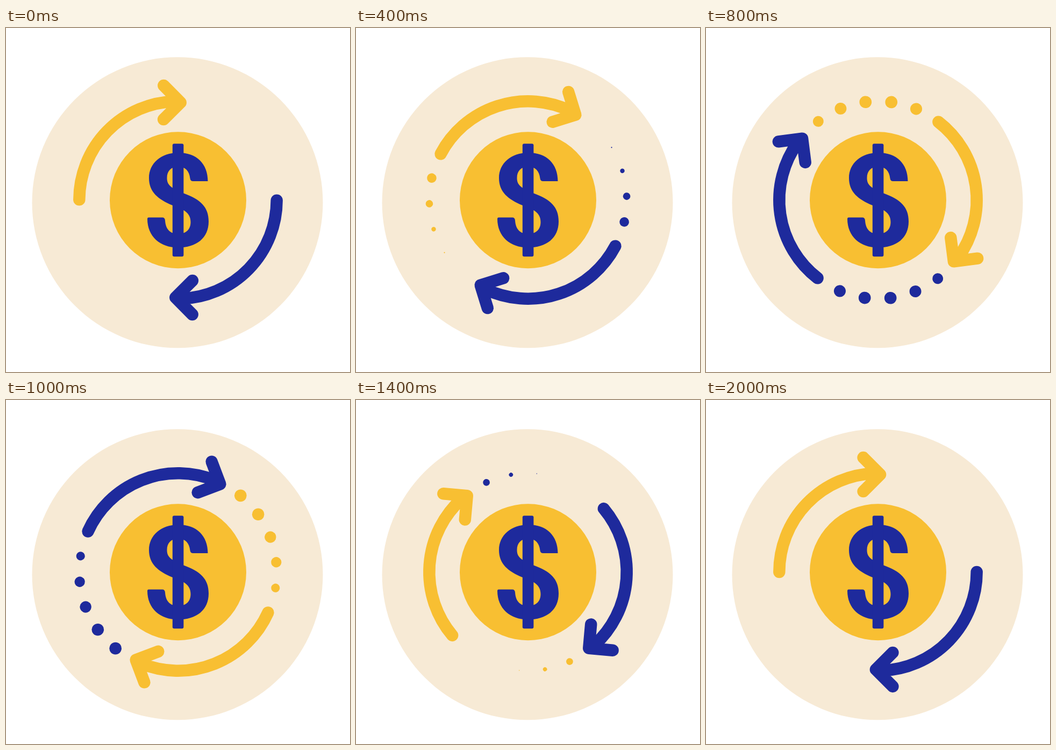
An HTML page with a canvas for the animation above (3 s loop, 640 px wide and 640 px high).

```html
<!DOCTYPE html>
<html lang="en">
<head>
<meta charset="utf-8">
<title>Money cycle</title>
<style>
html, body { margin: 0; width: 100%; height: 100%; overflow: hidden; background: #fff; }
canvas { display: block; width: 640px; height: 640px; }
</style>
</head>
<body>
<canvas id="stage" width="640" height="640"></canvas>
<script>
const ctx = document.getElementById('stage').getContext('2d');
const YELLOW = '#f8bf32', BLUE = '#1e2a9c', CREAM = '#f7ead5';
const LOOP = 3000, STEP = 100, LAST_STEP = 20;
const SPIN = 47;            // length of the turn, in ticks of 1/24 s
const RADIUS = 183.7, STROKE = 22.5, DOT = 11.35;
const rad = deg => deg * Math.PI / 180;

const dollar = new Path2D(
  'M375.5 285C375.5 253 355 232 321 232C288 232 266 252 266 279' +
  'C266 305 283 319 310 330L330.5 339C339 344 343.5 351 343.5 361' +
  'C343.5 375 335 383 320 383C305 383 297 374 296 358' +
  'Q295.5 352.5 291 352.5L265 352.5Q263 352.5 263 355' +
  'C263 388 287 408.5 320 408.5C354 408.5 377 391 377 360' +
  'C377 333 362 319 330.5 307.5L310 297.5C302 292 299.5 287 299.5 279' +
  'C299.5 266 307 258 320 258C334 258 341 266 342.5 280Q343 285 348 285Z');
const bar = new Path2D();
bar.roundRect(309.8, 215.3, 20.6, 210, 3);

// cubic-bezier(.53, 0, .47, 1)
function ease(x) {
  if (x >= 1) return 1;
  let lo = 0, hi = 1;
  for (let i = 0; i < 30; i++) {
    const s = (lo + hi) / 2, r = 1 - s;
    if (3 * r * r * s * 0.53 + 3 * r * s * s * 0.47 + s * s * s < x) lo = s;
    else hi = s;
  }
  return lo * lo * (3 - 2 * lo);
}

// A dot swells over ticks 2 to 14.5 and shrinks over ticks 16 to 29.
function dotSize(tick) {
  const v = tick < 14.5 ? (14.5 - tick) / 12.5 : Math.max(0, tick - 16) / 13;
  return DOT * Math.max(0, 1 - v * v);
}

function disc(x, y, r, color) {
  ctx.fillStyle = color;
  ctx.beginPath();
  ctx.arc(x, y, r, 0, 2 * Math.PI);
  ctx.fill();
}

function arrow(turn, tick, color) {
  ctx.save();
  ctx.translate(320, 320);
  ctx.rotate(rad(turn));
  ctx.strokeStyle = color;
  ctx.lineWidth = STROKE;
  ctx.lineCap = ctx.lineJoin = 'round';
  ctx.beginPath();
  ctx.arc(0, 0, RADIUS, rad(180), rad(268));
  ctx.moveTo(-27.4, -212.9);
  ctx.lineTo(4.1, -181.4);
  ctx.lineTo(-27.4, -149.9);
  ctx.stroke();
  for (let k = 1; k <= 5; k++) {
    const a = rad(180 - 15 * k), r = dotSize(tick - 2 * k);
    if (r > 0) disc(RADIUS * Math.cos(a), RADIUS * Math.sin(a), r, color);
  }
  ctx.restore();
}

function draw(ms) {
  const step = Math.min(LAST_STEP, Math.floor(ms % LOOP / STEP));
  const tick = 1 + 2.4 * step;
  const turn = 360 * ease(tick / SPIN);
  ctx.fillStyle = '#fff';
  ctx.fillRect(0, 0, 640, 640);
  disc(319, 324.8, 270.5, CREAM);
  disc(320, 320.2, 127, YELLOW);
  ctx.fillStyle = BLUE;
  ctx.fill(dollar);
  ctx.fill(bar);
  arrow(turn, tick, YELLOW);
  arrow(turn + 180, tick, BLUE);
}

function loop(now) {
  draw(now);
  requestAnimationFrame(loop);
}
draw(0);
requestAnimationFrame(loop);
</script>
</body>
</html>
```
